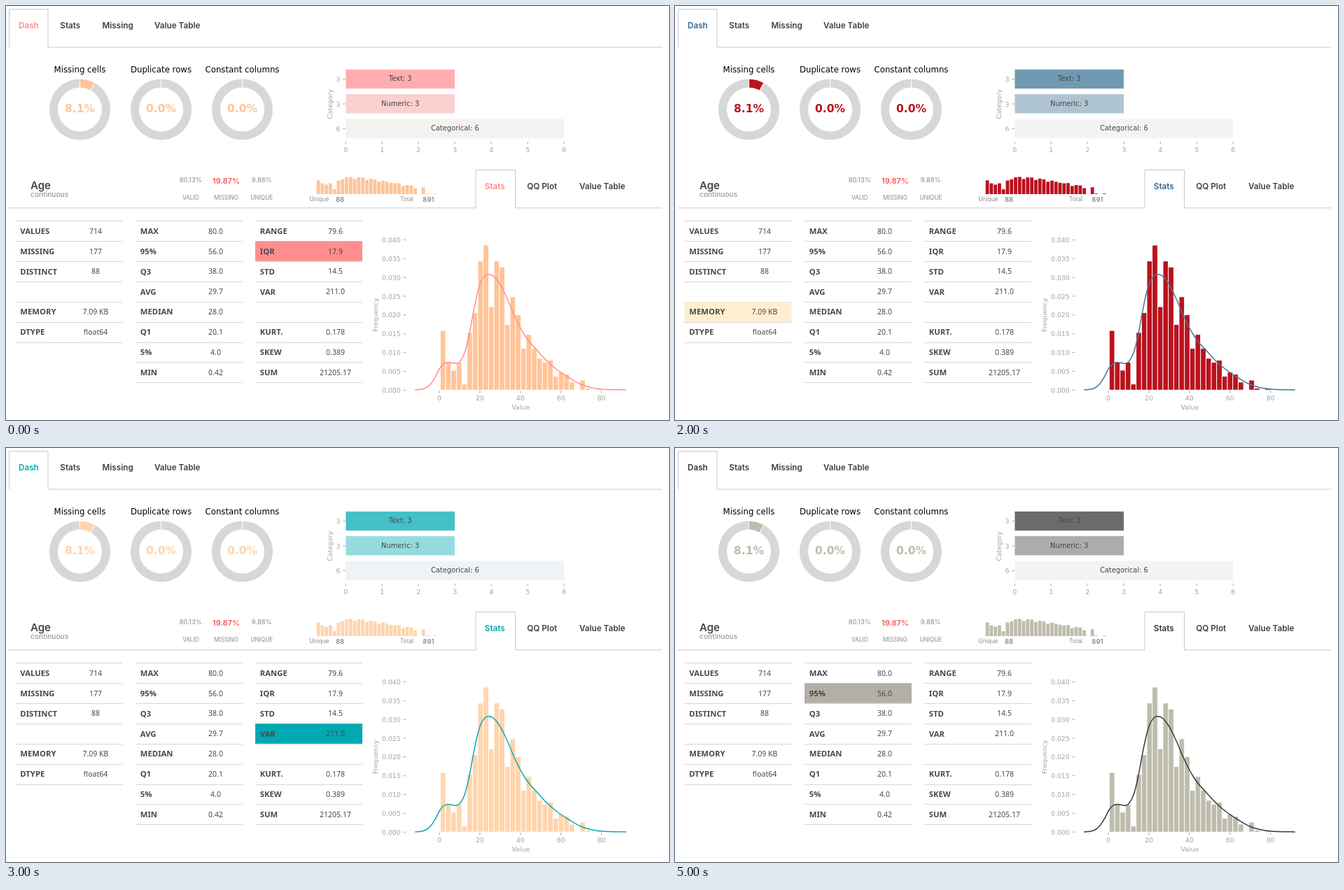
Write an HTML page that moves like this. It is 947 px wide and 592 px high and loops after 6 s.

```html
<!DOCTYPE html>
<html lang="en">
<head>
<meta charset="utf-8">
<title>Data profile themes</title>
<style>
  html, body { margin: 0; width: 100%; height: 100%; overflow: hidden; background: #fff; }
  svg { display: block; width: 947px; height: 592px; }
  .ui { font-family: Inter, sans-serif; }
  .tab { font-size: 11.7px; font-weight: 600; fill: #404040; }
  .name { font-size: 15px; font-weight: 600; fill: #444; }
  .kind { font-size: 10.2px; font-weight: 500; fill: #999; }
  .pct { font-size: 9.4px; fill: #8c8c8c; }
  .warn { font-size: 11px; font-weight: 600; fill: #fa5252; }
  .cap { font-size: 8.3px; fill: #8c8c8c; }
  .num { font-size: 9.5px; font-weight: 600; fill: #8a8a8a; }
  .plot { font-family: "DejaVu Sans", sans-serif; }
  .title { font-size: 11.75px; fill: #000; }
  .big { font-size: 15.5px; font-weight: 700; }
  .axis { font-size: 9.4px; fill: #a3a3a3; }
  .in { font-size: 9.85px; fill: #444; }
  .cell { font-family: "Noto Sans", sans-serif; font-size: 10.5px; fill: #484848; }
  .key { font-size: 11.3px; font-weight: 700; }
  .rule { fill: none; stroke: #c9c9c9; }
  .line { fill: none; stroke: #d6d6d6; }
  .tick { stroke: #999; stroke-width: .8; }
</style>
</head>
<body>
<svg id="stage" viewBox="0 0 947 592" xmlns="http://www.w3.org/2000/svg"></svg>
<script>
const stage = document.getElementById('stage');
const HOLD = 1000;
const ROW = 28.87, TOP = 307.3;

// mark: donuts and histograms, bars: category chart, cell: highlighted [column, row]
const themes = [
  { tab: '#ff8787', mark: '#ffc499', bars: ['#ffadb0', '#facfcf', '#f3f2f1'], curve: '#ff8f8f', fill: '#ff8f8f', cell: [2, 1] },
  { tab: '#b85c1e', mark: '#9aa97f', bars: ['#cb8e5f', '#dfbfa4', '#f3f2f1'], curve: '#b5622a', fill: '#9aa97f', cell: [1, 2] },
  { tab: '#2f6690', mark: '#bb121e', bars: ['#7099b2', '#aec4d1', '#f2f4f3'], curve: '#45779a', fill: '#ffeecf', cell: [0, 4] },
  { tab: '#00a9b3', mark: '#ffd5ae', bars: ['#44c0c7', '#95dbdd', '#eef3f5'], curve: '#0fa8b0', fill: '#00a9b3', cell: [2, 3] },
  { tab: '#f5cb4c', mark: '#ffba36', bars: ['#f6dd86', '#f5e7b8', '#f2f1ef'], curve: '#14141f', fill: '#f2cf5b', cell: [1, 3] },
  { tab: '#333533', mark: '#bebcad', bars: ['#696c6b', '#abacae', '#f2f4f3'], curve: '#3a3a3a', fill: '#b4aea6', cell: [1, 1] }
];

const columns = [
  { x: 13.5, rows: ['VALUES 714', 'MISSING 177', 'DISTINCT 88', '', 'MEMORY 7.09 KB', 'DTYPE float64'] },
  { x: 185, rows: ['MAX 80.0', '95% 56.0', 'Q3 38.0', 'AVG 29.7', 'MEDIAN 28.0', 'Q1 20.1', '5% 4.0', 'MIN 0.42'] },
  { x: 356, rows: ['RANGE 79.6', 'IQR 17.9', 'STD 14.5', 'VAR 211.0', '', 'KURT. 0.178', 'SKEW 0.389', 'SUM 21205.17'] }
];

const counts = [30, 14, 10, 14, 3, 29, 39, 65, 73, 42, 65, 62, 33, 47, 38,
  21, 28, 21, 16, 14, 15, 7, 9, 8, 4, 0, 5, 1, 0, 1];

const density = [[585, 548.9], [593, 548.3], [600, 546], [607, 540], [614, 529], [620, 517.5],
  [626, 511], [632, 509.5], [638, 510.6], [644, 511], [649, 507.5], [655, 496], [661, 473],
  [667, 441], [673, 412], [679, 393], [685, 385], [690, 383.7], [696, 386], [703, 394],
  [710, 406], [717, 421], [725, 440], [733, 457], [741, 471], [749, 482], [757, 490.5],
  [773, 508], [789, 521.5], [805, 532], [821, 541], [836, 545.7], [850, 547.8], [862, 548.5], [885, 548.9]];

function add(tag, attrs, text) {
  const el = document.createElementNS(stage.namespaceURI, tag);
  for (const k in attrs) el.setAttribute(k, attrs[k]);
  if (text !== undefined) el.textContent = text;
  return stage.appendChild(el);
}
const label = (cls, x, y, text, anchor = 'start', more = {}) =>
  add('text', { class: cls, x, y, 'text-anchor': anchor, ...more }, text);
const box = (x, y, width, height, more = {}) => add('rect', { x, y, width, height, ...more });
const path = (cls, d) => add('path', { class: cls, d });
const tabLabel = (x, y, text) => label('ui tab', x, y, text);

// Smooth curve through points
function spline(p) {
  let d = `M${p[0]}`;
  for (let i = 0; i < p.length - 1; i++) {
    const a = p[i - 1] || p[i], b = p[i], c = p[i + 1], e = p[i + 2] || c;
    const at = (q, r, s, sign) => [0, 1].map(k => q[k] + sign * (s[k] - r[k]) / 6);
    d += `C${at(b, a, c, 1)} ${at(c, b, e, -1)} ${c}`;
  }
  return d;
}

function wedge(cx, cy, from, to) {
  const at = (r, t) => `${cx + r * Math.sin(t)} ${cy - r * Math.cos(t)}`;
  const big = to - from > Math.PI ? 1 : 0;
  return `M${at(44, from)}A44 44 0 ${big} 1 ${at(44, to)}L${at(31, to)}A31 31 0 ${big} 0 ${at(31, from)}Z`;
}

const parts = { tab: [], mark: [], bars: [] };

function drawTabs() {
  path('rule', 'M4.5 59V4.5H60V59H937');
  parts.tab.push(tabLabel(18, 31.5, 'Dash'));
  tabLabel(77.3, 31.5, 'Stats');
  tabLabel(137.5, 31.5, 'Missing');
  tabLabel(212, 31.5, 'Value Table');
  path('rule', 'M4 288.8H671V234.5H727.5V288.8H937');
  parts.tab.push(tabLabel(683.8, 261.5, 'Stats'));
  tabLabel(744.3, 261.5, 'QQ Plot');
  tabLabel(819, 261.5, 'Value Table');
}

function drawDonuts() {
  [['Missing cells', .081], ['Duplicate rows', 0], ['Constant columns', 0]].forEach(([name, share], i) => {
    const x = 105.5 + 116 * i, y = 148, cut = share * 2 * Math.PI;
    const edge = { stroke: '#fff', 'stroke-width': 1 };
    add('path', { d: wedge(x, y, cut, 2 * Math.PI - 1e-4), fill: '#d7d7d7', ...edge });
    if (share) parts.mark.push(add('path', { d: wedge(x, y, 0, cut), ...edge }));
    label('plot title', x, 94.5, name, 'middle');
    parts.mark.push(label('plot big', x, 152, (share * 100).toFixed(1) + '%', 'middle'));
  });
}

function drawCategories() {
  [['Text', 3], ['Numeric', 3], ['Categorical', 6]].forEach(([name, n], i) => {
    const y = 104.3 + 35.4 * i;
    parts.bars.push(box(485, y - 14, 52.1 * n, 28.2, { stroke: '#fff', 'stroke-width': .8 }));
    label('plot in', 485 + 26.05 * n, y + 3, `${name}: ${n}`, 'middle');
    label('plot axis', 477.5, y + 3.8, n, 'end');
    path('tick', `M481 ${y + .3}h4`);
  });
  for (let n = 0; n <= 6; n++) {
    const x = 485.2 + 52 * n;
    path('tick', `M${x} 193.5v4`);
    label('plot axis', x, 208.5, n, 'middle');
  }
  label('plot axis', 0, 0, 'Category', 'middle', { transform: 'translate(466 140.3) rotate(-90)' });
}

function drawSummary() {
  label('ui name', 35, 261.5, 'Age');
  label('ui kind', 35, 273, 'continuous');
  [['80.13%', 'VALID', 263.8], ['19.87%', 'MISSING', 314.5], ['9.88%', 'UNIQUE', 365.3]].forEach(([v, name, x], i) => {
    label(i === 1 ? 'ui warn' : 'ui pct', x, i === 1 ? 253.5 : 252, v, 'middle');
    label('ui cap', x, 276.5, name, 'middle');
  });
  counts.forEach((n, i) => {
    if (!n) return;
    const h = 5.55 * Math.log(n) + .8;
    parts.mark.push(box(443.7 + 5.77 * i, 269 - h, 4.8, h));
  });
  label('ui cap', 433.5, 279, 'Unique');
  label('ui num', 471, 279.7, '88');
  label('ui cap', 563, 279, 'Total');
  label('ui num', 595.3, 279.7, '891');
}

function drawTables() {
  for (const { x, rows } of columns) {
    for (let i = 0; i <= rows.length; i++) path('line', `M${x} ${Math.round(TOP + ROW * i) + .5}h153`);
  }
  parts.cell = box(0, 0, 153, 28.5);
  for (const { x, rows } of columns) {
    rows.forEach((row, i) => {
      const [, key, value] = row.match(/^(\S*) ?(.*)$/);
      const y = TOP + ROW * i + 18.6;
      label('cell key', x + 6.8, y, key);
      label('cell', x + 114.5, y - .2, value, 'middle');
    });
  }
}

function drawHistogram() {
  counts.forEach((n, i) => {
    if (!n) return;
    const h = 2.838 * n;
    parts.mark.push(box(620.3 + 7.67 * i, 549.2 - h, 7.67, h, { stroke: '#fff', 'stroke-width': .9 }));
  });
  parts.curve = add('path', { d: spline(density), fill: 'none', 'stroke-width': 1.5, 'stroke-linecap': 'square' });
  for (let i = 0; i <= 8; i++) {
    const y = 549.2 - 26.85 * i;
    path('tick', `M567.3 ${y}h4`);
    label('plot axis', 563.8, y + 3.6, (i * .005).toFixed(3), 'end');
  }
  for (let i = 0; i <= 4; i++) {
    const x = 619 + 57.9 * i;
    path('tick', `M${x} 549.8v4`);
    label('plot axis', x, 564, i * 20, 'middle');
  }
  label('plot axis', 735.3, 577.3, 'Value', 'middle');
  label('plot axis', 0, 0, 'Frequency', 'middle', { transform: 'translate(531 441.7) rotate(-90)' });
}

function paint(theme) {
  parts.tab.forEach(el => el.style.fill = theme.tab);
  parts.mark.forEach(el => el.style.fill = theme.mark);
  parts.bars.forEach((el, i) => el.style.fill = theme.bars[i]);
  parts.curve.style.stroke = theme.curve;
  parts.cell.style.fill = theme.fill;
  const [col, row] = theme.cell;
  parts.cell.setAttribute('x', columns[col].x);
  parts.cell.setAttribute('y', Math.round(TOP + ROW * row) + .3);
}

drawTabs();
drawDonuts();
drawCategories();
drawSummary();
drawTables();
drawHistogram();

let start, shown;
function tick(now) {
  start ??= now;
  const i = Math.floor((now - start) / HOLD) % themes.length;
  if (i !== shown) paint(themes[shown = i]);
  requestAnimationFrame(tick);
}
paint(themes[shown = 0]);
requestAnimationFrame(tick);
</script>
</body>
</html>
```
